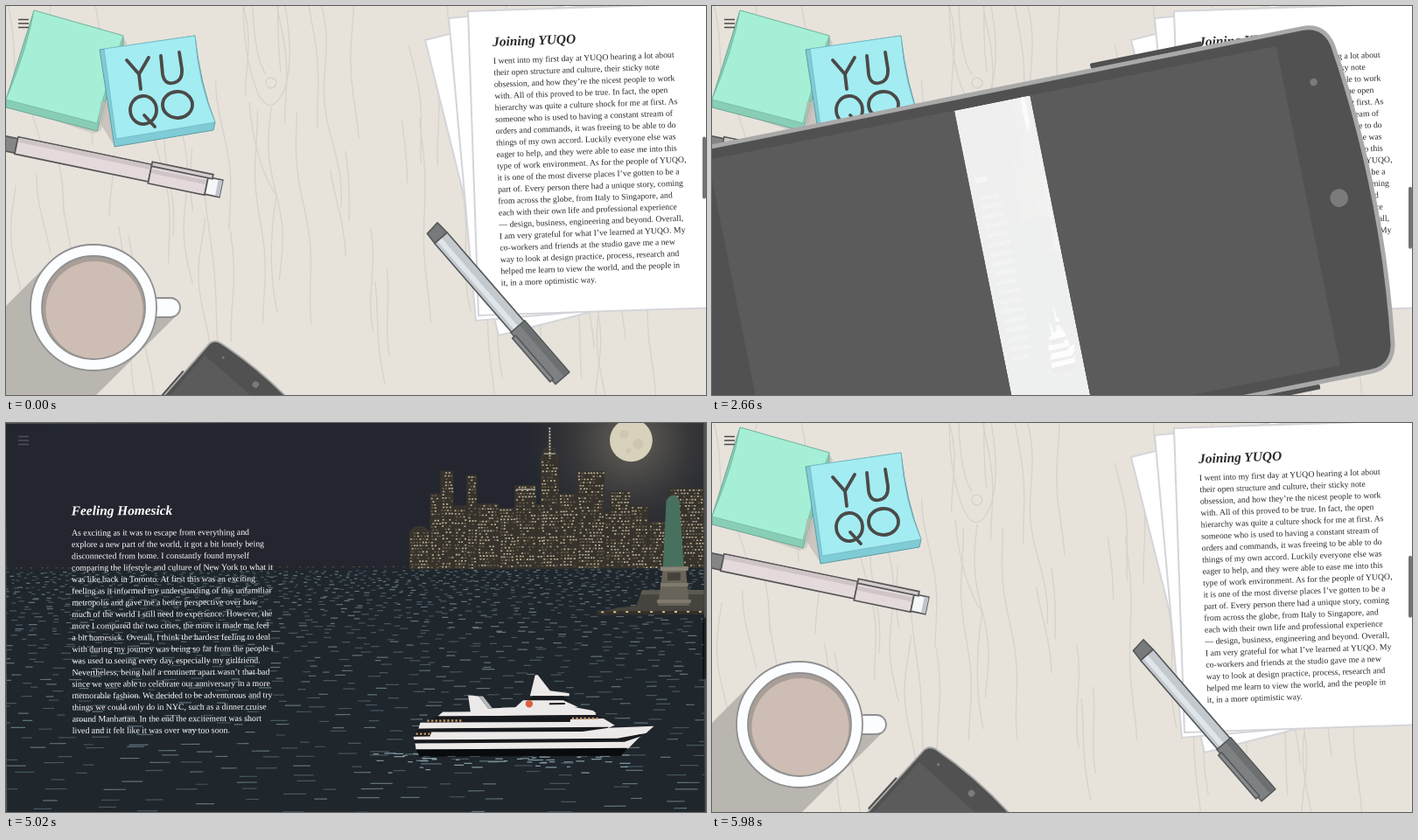
Animation of 800x445 px, one loop 6040 ms. Source, as an HTML page:

```html
<!DOCTYPE html>
<html lang="en">
<head>
<meta charset="utf-8">
<title>Desk to harbour</title>
<style>
  html, body { margin: 0; width: 100%; height: 100%; overflow: hidden; background: #e7e3db; }
  svg { display: block; width: 100vw; height: 100vh; }
  text { font-family: "Liberation Serif", "Times New Roman", serif; text-rendering: geometricPrecision; }
  .desk { font-size: 9.75px; fill: #2b2b2d; }
  .night { font-size: 9.9px; fill: #fff; }
  .title { font-size: 15.4px; font-weight: bold; font-style: italic; }
</style>
</head>
<body>
<svg id="stage" viewBox="0 0 800 445" preserveAspectRatio="none"></svg>
<script>
const stage = document.getElementById('stage');

const deskCopy = `I went into my first day at YUQO hearing a lot about
their open structure and culture, their sticky note
obsession, and how they’re the nicest people to work
with. All of this proved to be true. In fact, the open
hierarchy was quite a culture shock for me at first. As
someone who is used to having a constant stream of
orders and commands, it was freeing to be able to do
things of my own accord. Luckily everyone else was
eager to help, and they were able to ease me into this
type of work environment. As for the people of YUQO,
it is one of the most diverse places I’ve gotten to be a
part of. Every person there had a unique story, coming
from across the globe, from Italy to Singapore, and
each with their own life and professional experience
— design, business, engineering and beyond. Overall,
I am very grateful for what I’ve learned at YUQO. My
co-workers and friends at the studio gave me a new
way to look at design practice, process, research and
helped me learn to view the world, and the people in
it, in a more optimistic way.`;

const nightCopy = `As exciting as it was to escape from everything and
explore a new part of the world, it got a bit lonely being
disconnected from home. I constantly found myself
comparing the lifestyle and culture of New York to what it
was like back in Toronto. At first this was an exciting
feeling as it informed my understanding of this unfamiliar
metropolis and gave me a better perspective over how
much of the world I still need to experience. However, the
more I compared the two cities, the more it made me feel
a bit homesick. Overall, I think the hardest feeling to deal
with during my journey was being so far from the people I
was used to seeing every day, especially my girlfriend.
Nevertheless, being half a continent apart wasn’t that bad
since we were able to celebrate our anniversary in a more
memorable fashion. We decided to be adventurous and try
things we could only do in NYC, such as a dinner cruise
around Manhattan. In the end the excitement was short
lived and it felt like it was over way too soon.`;

function seeded(seed) {
  return () => (seed = (seed * 16807) % 2147483647) / 2147483647;
}
const poly = (points, fill, more = '') => `<polygon points="${points}" fill="${fill}" ${more}/>`;
const line = (d, stroke, width, more = '') =>
  `<path d="${d}" fill="none" stroke="${stroke}" stroke-width="${width}" ${more}/>`;
const rect = (x, y, w, h, fill, more = '') =>
  `<rect x="${x}" y="${y}" width="${w}" height="${h}" fill="${fill}" ${more}/>`;
const disc = (x, y, r, fill, more = '') => `<circle cx="${x}" cy="${y}" r="${r}" fill="${fill}" ${more}/>`;
const dash = (x, y, w) => `M${x.toFixed(1)} ${y.toFixed(1)}h${w.toFixed(1)}`;

// Title and lines, with the first baseline at the origin
function article(title, titleY, copy, gap) {
  const rows = copy.split('\n').map((row, i) => `<text y="${(i * gap).toFixed(2)}">${row}</text>`);
  return `<text class="title" y="${titleY}">${title}</text>${rows.join('')}`;
}

function grain() {
  const rnd = seeded(77);
  let d = '';
  for (let i = 0; i < 62; i++) {
    const x0 = (i * 13.4 + rnd() * 12) % 815, y0 = rnd() * 380 - 60;
    const len = 70 + rnd() * 190, amp = 1.5 + rnd() * 4, phase = rnd() * 6, lean = .03 + rnd() * .1;
    for (let y = 0; y <= len; y += 9) {
      const x = x0 + lean * y + amp * Math.sin(y / 28 + phase);
      d += `${y ? 'L' : 'M'}${x.toFixed(1)} ${(y0 + y).toFixed(1)}`;
    }
  }
  d += 'M298 84Q303 79 309 86Q309 94 302 94Q295 91 298 84M271 0Q272 65 289 102Q303 128 318 96Q330 62 319 0' +
       'M282 0Q284 60 297 78M314 75Q310 40 311 0M278 110Q284 180 309 217Q297 290 310 350';
  return line(d, '#d7d3cb', 1.4);
}

function stickyNotes() {
  return poly('0,112 100,146 108,143 138,42 134,36', '#cfcbc4') +
    `<path d="M32 5L134 34 134 43Q118 90 104 143L0 116 0 107Z" fill="#88cdb6" stroke="#6ea695"/>
     <path d="M32 5L134 34Q116 82 104 134L0 107Q24 50 32 5Z" fill="#a5efd6" stroke="#78b5a2" stroke-width=".8"/>` +
    poly('108,110 106,132 124,160 118,110', '#bdb9b3', 'opacity=".7"') +
    `<path d="M107 50L216 34Q222 90 239 133L237 142 124 161Z" fill="#7fcbd6" stroke="#5f9ca6"/>
     <path d="M112 49L216 34Q220 90 239 133L126 152Z" fill="#a3ecf2" stroke="#74b8c2" stroke-width=".8"/>` +
    line('M138 62L152 78L163 59M152 78L154 95M177 57L179 78Q181 90 191 88Q202 86 201 72L198 53' +
         'M142 120A15 16 0 1 1 172 118A15 16 0 1 1 142 120M158 125L170 138' +
         'M179 114A17 15 0 1 1 213 112A17 15 0 1 1 179 114',
         '#4b4a48', 3.8, 'stroke-linecap="round" stroke-linejoin="round"');
}

function leftPen() {
  const edge = 'stroke="#58585a" stroke-width="1.7"';
  return `<g transform="translate(0 158) rotate(11.7)">` +
    rect(-10, -9, 22, 17, '#858585', edge) +
    rect(12, -11, 156, 20, '#e4dadb', edge) + rect(13, -10, 154, 5, '#cfc4c6') +
    rect(168, -12, 66, 23, '#e4dadb', edge) + rect(169, -6, 64, 5, '#cfc4c6') +
    rect(234, -10, 17, 20, '#f4f6f8', edge) + rect(246, -9, 5, 18, '#bfc5ca') +
    rect(168, -14, 71, 5, '#d6cccd', edge) + '</g>';
}

function marker() {
  const edge = 'stroke="#55585a" stroke-width="1.6" stroke-linejoin="round"';
  return `<g transform="translate(487 253) rotate(49.1)">` +
    poly('0,-8 16,-9 16,10 2,9', '#77797a', edge) +
    rect(16, -9, 136, 19, '#c3c9cd', edge) + rect(17, 0, 134, 6, '#dfe5e8') +
    rect(150, -10, 78, 21, '#7d8182', edge) + rect(151, -9, 76, 7, '#6c7071') +
    rect(156, 9, 66, 5, '#86898a', edge) + '</g>';
}

function mug() {
  const edge = 'stroke="#8f9092" stroke-width="1.8"';
  return poly('49,294 0,343 0,445 103,445 197,352 150,330', '#b9b5af') +
    rect(160, 334, 39, 22, '#fbfdff', `rx="11" ${edge}`) +
    disc(100, 345, 72, '#fbfdff', edge) + disc(100, 345, 59, '#a89e97', edge) +
    disc(101, 347.5, 55.5, '#cebdb4');
}

function desk() {
  const edge = 'stroke="#d5d4d9" stroke-width="2"';
  return rect(0, 0, 800, 445, '#e7e3db') + grain() + stickyNotes() + leftPen() + mug() +
    poly('479,39 740,-26 825,310 563,377', '#fff', edge) +
    poly('506,14 820,-14 850,333 537,360', '#fff', edge) +
    poly('528,6 830,-4 842,344 540,354', '#fff', edge) +
    `<g class="desk" transform="translate(557 66) rotate(-2)">${article('Joining YUQO', -20, deskCopy, 13.37)}</g>` +
    marker();
}

// Rows of dashes that grow longer and wider apart towards the viewer
function water() {
  const rnd = seeded(4242), d = ['', ''];
  for (let y = 168; y < 446; y += 2.4 + 9 * (y - 166) / 280) {
    const depth = (y - 166) / 280, len = 3.5 + 19 * depth;
    for (let x = -len * rnd() * 3; x < 800; x += len * (1.9 + 2.4 * rnd()))
      d[rnd() > .35 ? 0 : 1] += dash(x, y + (rnd() - .5) * (2 + 7 * depth), len * (.6 + .7 * rnd()));
  }
  return line(d[0], '#46565f', 1.2) + line(d[1], '#5f727a', 1.2);
}

function skyline() {
  const rnd = seeded(99);
  // left, width, top
  const towers = [[462, 24, 122], [486, 13, 79], [498, 15, 53], [513, 15, 93], [528, 12, 58], [540, 25, 91],
    [565, 19, 96], [583, 25, 70], [608, 8, 92], [613, 21, 41], [634, 21, 80], [655, 31, 54], [686, 7, 102],
    [692, 24, 77], [716, 20, 94], [736, 24, 112], [760, 40, 74]];
  let walls = '', lit = '', dim = '';
  for (const [x, w, top] of towers) {
    walls += rect(x, top, w, 167 - top, '#37332c');
    for (let y = top + 2.5; y < 165; y += 3.6)
      for (let a = x + 1 + rnd() * 2; a < x + w - 2; a += 2.9 + rnd() * 1.4) {
        const p = rnd();
        if (p > .6) lit += dash(a, y, 2.1); else if (p > .3) dim += dash(a, y, 2);
      }
  }
  let shore = '';
  for (let x = 0; x < 750; x += 5 + rnd() * 9) shore += dash(x, 163, 2);
  return `<path d="M462 124Q474 110 486 124M613 42L618 28H629L634 42M622 28L623.5 4 625 28" fill="#37332c" stroke="#4b463c" stroke-width=".8"/>` +
    walls + line(dim, '#6d624e', 1.5) + line(lit, '#b8ac91', 1.6) +
    line('M617 34H630M585 75H607', '#b8b2a2', 1.4) +
    line('M623.7 4V40', '#c9c5b8', 1.8, 'stroke-dasharray="2 1.5"') + line(shore, '#5f533c', 1.1);
}

function island() {
  return `<path d="M676 217L702 211L722 209L729 191H800V219H680Z" fill="#46443e"/>` +
    poly('729,191 800,191 800,196 727,196', '#5d5a51') + rect(676, 215, 124, 4, '#332f2a') +
    poly('753,166 779,166 783,209 747,209', '#69645a') + rect(750, 164, 32, 5, '#8b8578') +
    rect(750, 183, 32, 4, '#817a6e') + rect(758, 171, 15, 9, '#46413a') + rect(746, 202, 39, 4, '#80796c') +
    line('M682 216H800', '#e1c892', 1.8, 'stroke-dasharray="3 11"') +
    '<path d="M757 88Q765 76 772 88L777 164H753Z" fill="#48705f"/>';
}

function ship() {
  const white = '#ece9e9', dark = '#17191d', shade = '#b9b7ba';
  const rnd = seeded(31);
  let foam = '';
  for (let i = 0; i < 85; i++) foam += dash(420 + rnd() * 290, 377 + rnd() * rnd() * 26, 4 + rnd() * 9);
  return line(foam, '#8199a1', 1.2) +
    poly('606,288 609,288 623,306 645,309 645,312 600,312', white) +
    poly('603,312 638,312 645,318 597,318', dark) +
    poly('582,326 592,317 638,317 655,325', white) +
    poly('529,311 541,312 552,326 640,323 672,329 676,332 532,332', white) +
    poly('541,312 546,312 557,326 552,326', shade) +
    poly('500,330 672,329 676,334 494,335', white) +
    poly('492,335 676,334 683,338 646,342 480,342', dark) +
    poly('474,342 646,342 646,339 684,338 697,346 690,349 472,349', white) +
    poly('472,349 690,348 686,353 468,353', dark) +
    poly('466,358 487,353 660,353 690,349 742,347 733,355 700,362 467,362', white) +
    poly('467,362 700,361 728,356 724,361 708,366 468,366', dark) +
    poly('468,366 708,365 726,359 712,373 469,373', white) +
    poly('469,373 712,372 704,381 473,381', '#090b0e') +
    poly('468,353 487,353 485,358 466,358', dark) +
    line('M482 340h40M648 338h30M469 355h16', '#c99a68', 2.4, 'stroke-dasharray="2.4 2.2"') +
    line('M622 321H640', dark, 2) + disc(599, 321, 4.2, '#d9613f');
}

function night() {
  return rect(0, -4, 800, 455, '#23262f') + rect(0, -4, 800, 455, 'url(#glow)') +
    disc(717, 19, 24.5, '#d8d1bb') + disc(709, 12, 5, '#cec6af') + disc(725, 23, 6, '#cec6af') + disc(714, 31, 3, '#cec6af') +
    skyline() + rect(0, 166, 800, 285, '#1f262c') + water() + island() + ship() +
    `<g class="night" transform="translate(75 126)">${article('Feeling Homesick', -23.5, nightCopy, 13.35)}</g>`;
}

function phone() {
  return `<path d="M-60-17H840Q870-17 877 14Q905 225 877 436Q870 467 840 467H-60Q-90 467-97 436Q-125 225-97 14Q-90-17-60-17Z"
      fill="#515151" stroke="#a9a9a9" stroke-width="6"/>` +
    rect(543, -27, 157, 7, '#505050', 'rx="2"') + rect(690, 470, 77, 7, '#505050', 'rx="2"') +
    rect(0, 0, 800, 450, '#5b5b5b') + disc(841, 59, 5.2, '#7b7b7b') + disc(844, 223, 12.5, '#7b7b7b') +
    `<g id="page" clip-path="url(#screen)"><g transform="translate(0 2.5)">${night()}</g>` +
    rect(0, 0, 800, 450, '#fff', 'id="veil"') + '</g>';
}

stage.innerHTML = `<defs>
    <clipPath id="screen"><rect width="800" height="450"/></clipPath>
    <radialGradient id="glow" gradientUnits="userSpaceOnUse" cx="717" cy="19" r="150">
      <stop offset=".12" stop-color="#57554f"/><stop offset=".45" stop-color="#37373a"/>
      <stop offset="1" stop-color="#23262f" stop-opacity="0"/>
    </radialGradient>
  </defs>${desk()}<g id="phone">${phone()}</g>
  <path id="menu" d="M14 15.5H26M14 20H26M14 24.5H26" stroke-width="1.4"/>
  <rect id="thumb" x="796" width="4" height="71" rx="2" fill="#000" opacity=".55"/>`;

const part = id => document.getElementById(id);
const phoneNode = part('phone'), page = part('page'), veil = part('veil'), menu = part('menu'), thumb = part('thumb');
const LOOP = 6040, TICK = 60, STEPS = 18, SETTLE = 17.7;

// The scroll advances in ticks, rests, and goes back
function stepAt(t) {
  if (t < 2000) return 0;
  if (t < 3020) return 1 + Math.floor((t - 2000) / TICK);
  if (t < 5020) return STEPS;
  return STEPS - 1 - Math.floor((t - 5020) / TICK);
}

const mix = (a, b, q, power = 1) => a + (b - a) * Math.pow(q, power);

function render(step) {
  const x = Math.min(1, step / SETTLE);
  const q = Math.min(1, .4 * x + 2.2 * x * x - 1.6 * x * x * x);
  const cx = mix(200, 400, q), cy = mix(532, 222.5, q, 1.07);
  const turn = mix(-49, 0, q, 1.08), scale = mix(.294, 1, q, 1.15);
  phoneNode.setAttribute('transform', `translate(${cx} ${cy}) rotate(${turn}) scale(${scale}) translate(-400 -225)`);

  const open = Math.max(0, Math.min(1, (q - .755) / .216));
  page.setAttribute('display', open ? 'inline' : 'none');
  page.setAttribute('transform', `translate(400 0) scale(${open || 1} 1) translate(-400 0)`);
  veil.setAttribute('opacity', 1 - Math.pow(open, 1.3));
  menu.setAttribute('stroke', open > .5 ? '#4d5057' : '#4a4a49');
  thumb.setAttribute('y', mix(149.5, 222.5, q));
}

const start = performance.now();
function frame() {
  render(stepAt((performance.now() - start) % LOOP));
  requestAnimationFrame(frame);
}
frame();
</script>
</body>
</html>
```
